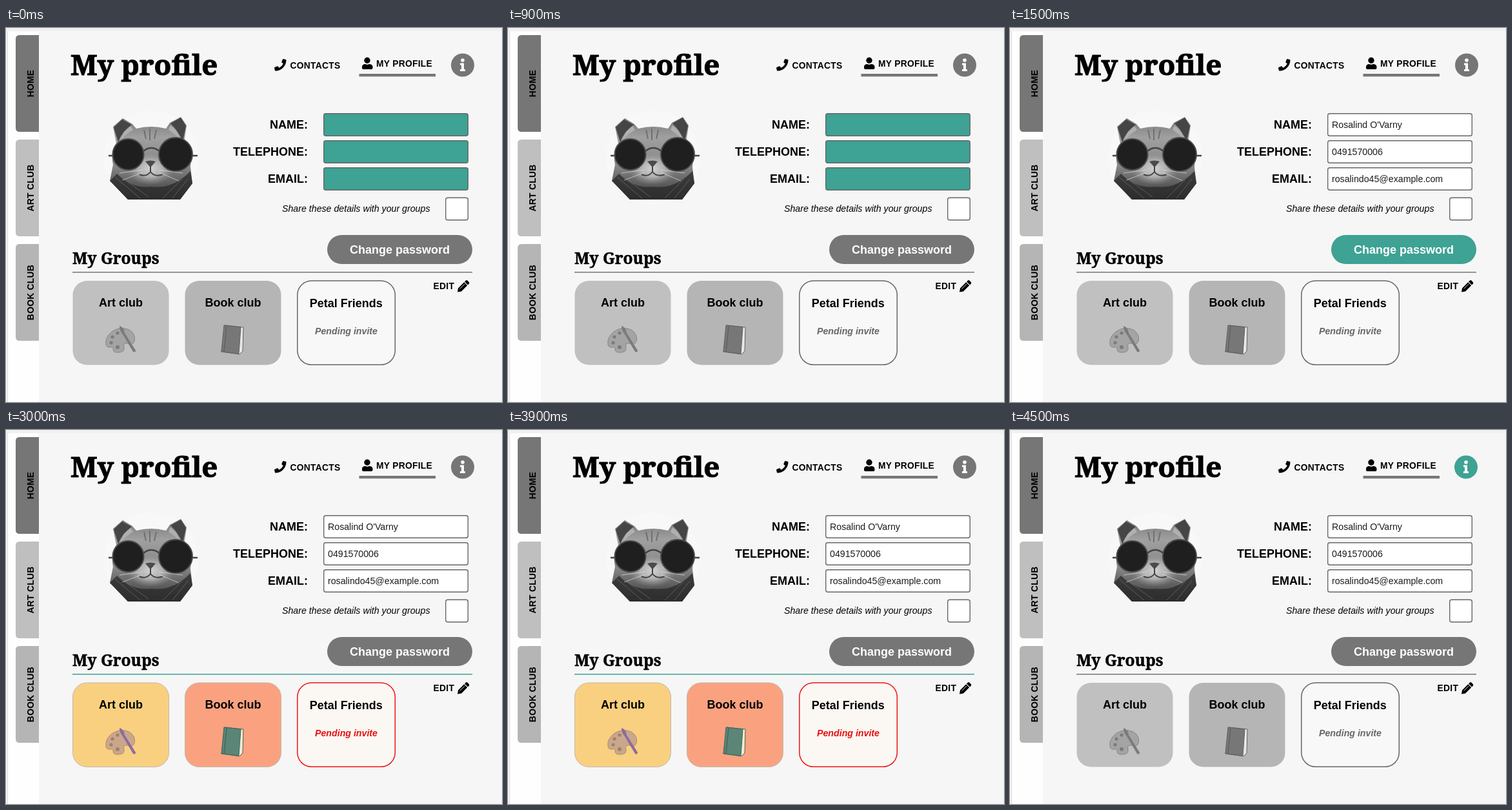
An HTML page that plays this animation: 769x580 px, repeating every 6000 ms.

```html
<!DOCTYPE html>
<html lang="en">
<head>
<meta charset="utf-8">
<title>My profile</title>
<style>
html, body { margin: 0; width: 100%; height: 100%; overflow: hidden; background: #f6f6f6; }
svg {
  display: block; width: 769px; height: 580px;
  font-family: "Liberation Sans", Arial, sans-serif; font-size: 14.2px;
  --grey: #767676; --teal: #3ea294;
  --art: #c0c0c0; --book: #b5b5b5; --edge: transparent;
  --palette: #a4a4a4; --hole: #7b7b7b; --brush: #7b7b7b; --cover: #777; --spine: #606060; --pages: #e6e6e6;
  --invite: #f8f8f8; --outline: #666; --note: #666;
}
.title { font: 700 43.8px "Noto Serif", serif; stroke: #000; stroke-width: 1; }
.subtitle { font-size: 24.5px; stroke-width: .5; }
.nav { font-weight: 700; font-size: 13.8px; letter-spacing: .3px; }
.big { font-weight: 700; font-size: 18px; }
.mid { text-anchor: middle; }
.end { text-anchor: end; }
.italic { font-style: italic; }
.box { fill: #fff; stroke: #666; stroke-width: 1.4; }
.button, .info { fill: var(--grey); }
.rule { stroke: var(--grey); stroke-width: 1.5; }
.card { stroke: var(--edge); }
.invite { fill: var(--invite); stroke: var(--outline); stroke-width: 1.5; }
.note { fill: var(--note); font-weight: 700; }
.value { fill: #1c1c1c; }

.fields .field { fill: var(--teal); }
.fields .value { visibility: hidden; }
.password .button, .help .info { fill: var(--teal); }
.help .badge { transform: translateX(-1px); }
.groups .rule { stroke: var(--teal); }
.groups {
  --art: #f9d080; --book: #faa280; --edge: #c0b8ae;
  --palette: #caa78c; --hole: #a08068; --brush: #8a6c9e; --cover: #5b8577; --spine: #3f6759; --pages: #f4e8d0;
  --invite: #fbf8f3; --outline: #f01414; --note: #e81010;
}
</style>
</head>
<body>
<svg id="stage" class="fields" viewBox="0 0 769 580">
  <defs>
    <linearGradient id="fur" x1="0" y1="0" x2="0" y2="1">
      <stop offset="0" stop-color="#777"/>
      <stop offset=".25" stop-color="#a0a0a0"/>
      <stop offset=".6" stop-color="#858585"/>
      <stop offset="1" stop-color="#383838"/>
    </linearGradient>
    <radialGradient id="muzzle">
      <stop offset="0" stop-color="#d2d2d2"/>
      <stop offset=".5" stop-color="#b0b0b0"/>
      <stop offset="1" stop-color="#888" stop-opacity="0"/>
    </radialGradient>
  </defs>

  <rect width="769" height="580" fill="#f6f6f6"/>
  <rect x="3" y="5" width="48" height="575" fill="#fefefe"/>
  <rect width="769" height="5" fill="#f1f1f1"/>
  <path d="M2.5 5V580" stroke="#dcdcdc"/>

  <g id="tabs"></g>

  <text class="title" x="100" y="73">My profile</text>
  <path transform="translate(416 48) scale(.0361)" d="M493 25l-104-24c-11-3-23 3-27 14l-48 112c-4 10-1 21 7 28l61 49c-36 77-99 141-178 178l-49-61c-7-8-18-11-28-7l-112 48C4 367-2 378 1 389l24 104c2 11 12 19 23 19 256 0 464-208 464-464 0-11-8-21-19-23z"/>
  <text class="nav" x="440.500" y="63">CONTACTS</text>
  <circle cx="560" cy="50.300" r="4.700"/>
  <path d="M552 62V60.500Q552 56 557 56Q560 57.500 563 56Q568.500 56 568.500 60.500V62Q568.500 64 566.500 64H554Q552 64 552 62Z"/>
  <text class="nav" x="574" y="60">MY PROFILE</text>
  <rect x="547.500" y="71" width="118.500" height="4.300" fill="#767676"/>
  <g class="badge">
    <circle class="info" cx="708" cy="57.500" r="18"/>
    <circle cx="708" cy="50" r="2.800" fill="#fff"/>
    <path d="M704 54.500H710V64H712V67H704V64H706V57.500H704Z" fill="#fff"/>
  </g>

  <!-- portrait -->
  <circle cx="225" cy="201" r="73" fill="#f8f8f8"/>
  <path d="M166 153L181 140L196 149L202 156Q225 150 248 156L254 147L271 138L280 151L276 178Q288 195 286 216L289 241L270 266H189L161 237L166 212Q162 194 171 179Z" fill="url(#fur)"/>
  <path d="M167 154L180 142L195 150Q180 160 174 177Z M255 148L271 139L279 152L274 176Q266 158 255 148Z" fill="#454545"/>
  <path d="M193 152L183 161L176 176Q186 164 197 158Z M255 151L263 158L272 174Q262 164 252 158Z" fill="#b0b0b0"/>
  <path d="M214 158L217 172M223 156V174M233 158L230 172" stroke="#707070" stroke-width="2"/>
  <ellipse cx="224" cy="218" rx="38" ry="26" fill="url(#muzzle)"/>
  <path d="M161 237L172 226Q196 250 225 246Q260 250 286 222L289 241L270 266H189Z" fill="#292929" opacity=".75"/>
  <path d="M169 231L208 264M178 231L221 262M272 235L243 264M282 234L258 264" stroke="#707070" fill="none" opacity=".7"/>
  <path d="M216 207Q224 204 232 207L225 215H223Z" fill="#4b4b4b"/>
  <path d="M224 214V223Q217 232 207 227M224 223Q231 232 243 227" fill="none" stroke="#444" stroke-width="2"/>
  <path d="M212 220L176 225M212 224L180 236M237 220L274 225M237 224L268 237" stroke="#ddd" stroke-width=".7"/>
  <path d="M159 198H166M288 198H297M213 191Q225 181 238 191" fill="none" stroke="#444" stroke-width="2.500"/>
  <g fill="#1f1f1f" stroke="#4a4a4a" stroke-width="2">
    <circle cx="189.500" cy="196" r="24"/>
    <circle cx="263" cy="196" r="26"/>
  </g>

  <g id="form"></g>
  <text class="italic end" x="657.500" y="285">Share these details with your groups</text>
  <rect class="box" x="681.700" y="263.200" width="34.600" height="34.600" rx="3"/>
  <rect class="button" x="498" y="321" width="225" height="45" rx="22.500"/>
  <text class="big mid" x="610.500" y="350" fill="#fff">Change password</text>

  <text class="title subtitle" x="103" y="366">My Groups</text>
  <path class="rule" d="M103 378.700H723"/>
  <text class="nav" x="662.500" y="405">EDIT</text>
  <g transform="translate(700 409.500) rotate(-45)">
    <path d="M0 0L5 -3.500H18V3.500H5ZM19.200 -3.500H21.500Q23.500 -3.500 23.500 -1.500V1.500Q23.500 3.500 21.500 3.500H19.200Z"/>
    <path d="M6 -1H17" stroke="#f6f6f6" stroke-width=".8"/>
  </g>

  <rect class="card" x="103.500" y="392" width="149" height="130.500" rx="22" fill="var(--art)"/>
  <text class="big mid" x="178" y="432">Art club</text>
  <path d="M155 491Q153 480 164 471Q177 462 191 468Q202 475 199 486Q196 493 188 489Q181 488 183 495Q184 503 175 503Q167 504 166 499Q167 494 162 495Q156 496 155 491Z" fill="var(--palette)" stroke="var(--hole)" stroke-width=".8"/>
  <g fill="var(--hole)">
    <circle cx="163" cy="488" r="2.600"/><circle cx="165" cy="479" r="2.600"/>
    <circle cx="173" cy="473" r="2.600"/><circle cx="173" cy="495" r="3"/>
  </g>
  <path d="M176 462Q183 464 184 473L201 500Q201 504 197 502L181 475Q176 470 176 462Z" fill="var(--brush)"/>

  <rect class="card" x="277.500" y="392" width="149" height="130.500" rx="22" fill="var(--book)"/>
  <text class="big mid" x="352" y="432">Book club</text>
  <path d="M339 461L368 464L367 501L362 506L334 502Z" fill="var(--pages)" stroke="var(--spine)"/>
  <path d="M338 461L364 464L361 505L334 502Z" fill="var(--cover)" stroke="var(--spine)"/>
  <path d="M342 461.500L338 502.500" stroke="var(--spine)" stroke-width="1.300"/>

  <rect class="invite" x="451.800" y="392" width="151.500" height="130.300" rx="22"/>
  <text class="big mid" x="527.300" y="433">Petal Friends</text>
  <text class="note italic mid" x="527.500" y="475">Pending invite</text>
</svg>
<script>
const stage = document.getElementById("stage");
const tabs = [["HOME", "#767676"], ["ART CLUB", "#bfbfbf"], ["BOOK CLUB", "#b5b5b5"]];
const fields = [
  ["NAME:", "Rosalind O'Varny"],
  ["TELEPHONE:", "0491570006"],
  ["EMAIL:", "rosalindo45@example.com"]
];
const steps = ["fields", "password", "groups", "help"];

document.getElementById("tabs").innerHTML = tabs.map(([label, color], i) => {
  const y = 11 + 162 * i;
  return `<path d="M51 ${y}H21q-6 0-6 6v138q0 6 6 6H51Z" fill="${color}"/>
    <text class="nav mid" transform="translate(43 ${y + 75}) rotate(-90)">${label}</text>`;
}).join("");

document.getElementById("form").innerHTML = fields.map(([label, value], i) => {
  const y = 132 + 42 * i;
  return `<text class="big end" x="468" y="${y + 24}">${label}</text>
    <rect class="box field" x="492.700" y="${y + .7}" width="223.600" height="34.600" rx="3"/>
    <text class="value" x="499" y="${y + 23}">${value}</text>`;
}).join("");

function draw() {
  const step = steps[Math.floor(performance.now() % 6000 / 1500)];
  stage.setAttribute("class", step);
  requestAnimationFrame(draw);
}
draw();
</script>
</body>
</html>
```
